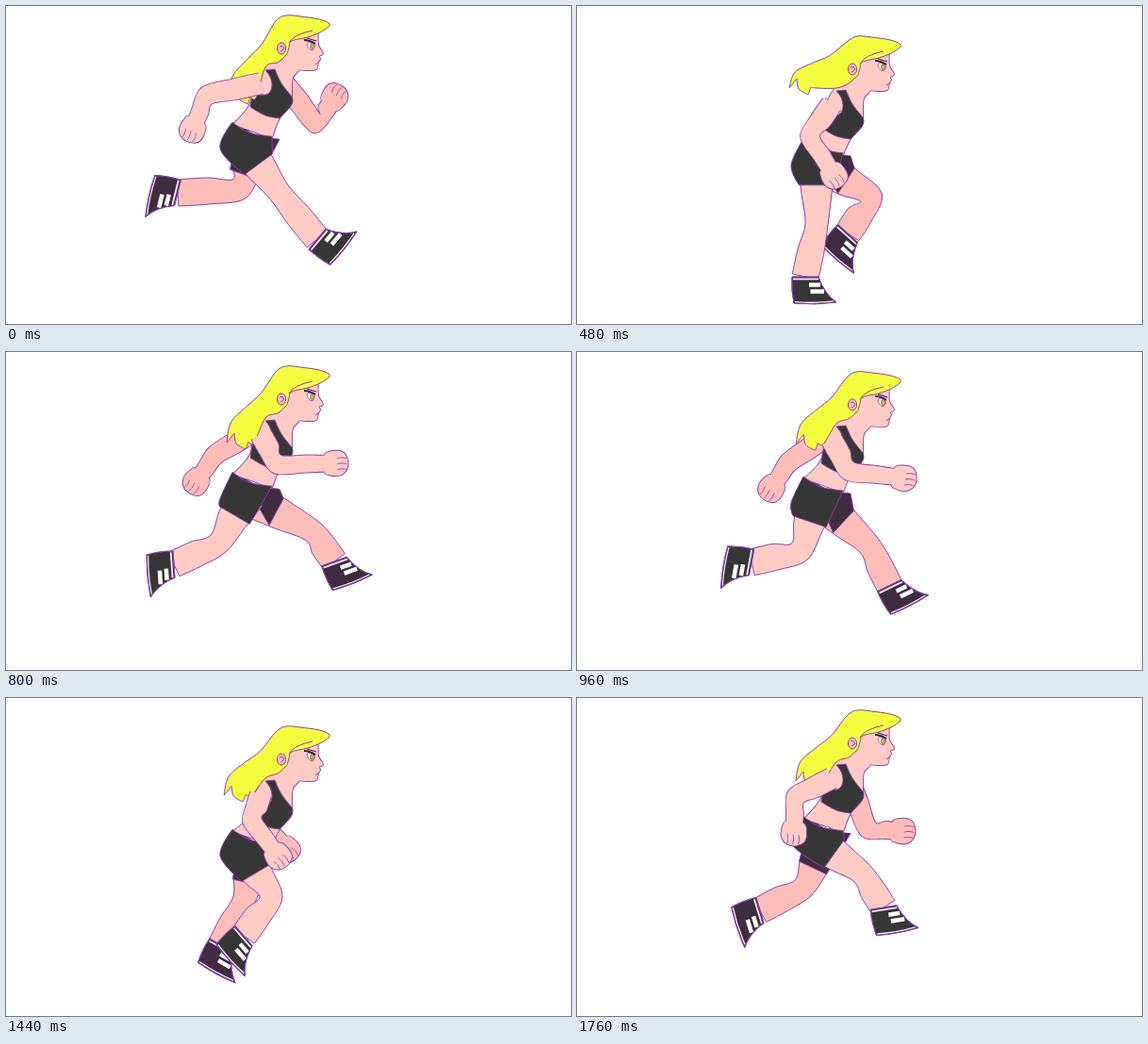
Animation of 599 by 337 pixels, one loop 1920 ms. Source, as an HTML page:

```html
<!DOCTYPE html>
<html lang="en">
<head>
<meta charset="utf-8">
<title>Run cycle</title>
<style>
html, body { margin: 0; width: 100%; height: 100%; overflow: hidden; background: #fff; }
svg { display: block; width: 100vw; height: 100vh; }
</style>
</head>
<body>
<svg id="stage" viewBox="0 0 599 337"></svg>
<script>
const STEP = 160, COUNT = 12;
const LINE = '#8440a8', NEAR = '#ffcbc5', FAR = '#ffbdb9', DARK = '#373636', DUSK = '#402c40', HAIR = '#f4fe3f';

// Key poses by drawing number; the drawings between them are interpolated.
// head: vertical shift, tip: height of the hair tip, legs: knee, ankle, foot angle, arms: elbow, hand.
const keys = {
  0: { head: -16, tip: 97, nearLeg: [290, 198, 330, 247, -50], farLeg: [247, 194, 182, 198, 104], nearArm: [213, 95, 198, 130], farArm: [330, 125, 348, 97] },
  1: { head: 0, tip: 90, nearLeg: [284, 218, 302, 272, -26], farLeg: [264, 213, 205, 237, 93], nearArm: [230, 117, 221, 159], farArm: [305, 147, 341, 127] },
  3: { head: 6, tip: 87, nearLeg: [254, 232, 242, 287, 0], farLeg: [312, 203, 287, 241, 42], nearArm: [247, 138, 272, 179], farArm: [265, 140, 270, 172] },
  5: { head: -11, tip: 96, nearLeg: [225, 203, 178, 225, 86], farLeg: [325, 190, 348, 222, -20], nearArm: [288, 119, 348, 118], farArm: [222, 109, 202, 137] },
  7: { head: 3, tip: 98, nearLeg: [254, 222, 206, 231, 98], farLeg: [289, 222, 298, 274, -18], nearArm: [282, 135, 328, 158], farArm: [238, 130, 228, 156] },
  9: { head: 4, tip: 103, nearLeg: [281, 211, 252, 252, 49], farLeg: [252, 215, 228, 262, 30], nearArm: [261, 130, 288, 167], farArm: [280, 140, 297, 160] },
  11: { head: -13, tip: 88, nearLeg: [302, 186, 325, 222, -9], farLeg: [240, 201, 194, 225, 73], nearArm: [232, 105, 230, 142], farArm: [309, 139, 344, 141] }
};

// Four-point midpoint of the odd neighbours, so that joints travel on smooth arcs.
function pose(i) {
  if (keys[i]) return keys[i];
  const [a, b, c, d] = [-3, -1, 1, 3].map(k => keys[(i + k + COUNT) % COUNT]);
  const mid = (p, q, r, s) => Array.isArray(p)
    ? p.map((_, k) => mid(p[k], q[k], r[k], s[k]))
    : (9 * (q + r) - p - s) / 16;
  return Object.fromEntries(Object.keys(a).map(k => [k, mid(a[k], b[k], c[k], d[k])]));
}

const pt = (x, y, hard = false) => ({ x, y, hard });
const move = (p, dx, dy, hard) => pt(p.x + dx, p.y + dy, hard);
const lerp = (p, q, t) => pt(p.x + (q.x - p.x) * t, p.y + (q.y - p.y) * t);
const heading = (p, q) => {
  const len = Math.hypot(q.x - p.x, q.y - p.y) || 1;
  return pt((q.x - p.x) / len, (q.y - p.y) / len);
};
// "x,y" words; * marks a corner
const points = (s, dy) => s.split(' ').map(w => {
  const [x, y] = w.split(',').map(parseFloat);
  return pt(x, y + dy, w.endsWith('*'));
});

function curve(pts, closed = true) {
  const n = pts.length, at = i => pts[(i + n) % n], f = v => v.toFixed(1);
  const handle = (i, s) => {
    const p = at(i), k = p.hard ? 0 : s / 6;
    return f(p.x + (at(i + 1).x - at(i - 1).x) * k) + ',' + f(p.y + (at(i + 1).y - at(i - 1).y) * k);
  };
  let d = `M${f(pts[0].x)},${f(pts[0].y)}`;
  for (let i = 0; i < n - !closed; i++)
    d += `C${handle(i, 1)} ${handle(i + 1, -1)} ${f(at(i + 1).x)},${f(at(i + 1).y)}`;
  return d + (closed ? 'Z' : '');
}

const path = (d, fill = 'none', line = LINE, w = 1) => `<path d="${d}" fill="${fill}" stroke="${line}" stroke-width="${w}"/>`;
// Several shapes sharing one outline
const merge = (shapes, fill) => shapes.map(d => path(d, fill, LINE, 1.8)).join('') + shapes.map(d => path(d, fill, 'none')).join('');

// Limb through three joints with half-widths at the joints and between them
function limb(a, b, c, widths) {
  const mid = [a, lerp(a, b, .5), b, lerp(b, c, .5), c];
  const side = s => mid.map((p, i) => {
    const d = heading(mid[Math.max(i - 1, 0)], mid[Math.min(i + 1, 4)]), w = s * widths[i];
    return move(p, d.y * w, -d.x * w, i % 4 === 0);
  });
  return curve([...side(1), ...side(-1).reverse()], false);
}

const shoe = (x, y, angle, fill) => {
  const body = 'M-14,0H14Q20,18 33,27Q10,30 -12,28Q-15,14 -14,0Z';
  return `<g transform="translate(${x} ${y}) rotate(${angle})">` + path(body, fill) +
    path('M-13,2.4H14', 'none', '#fbeafc', 1.8) + path('M-11,26.6Q10,28.2 30,25.8', 'none', '#fbeafc', 1.3) +
    path('M4,8.5H16M5.5,15.5H20', 'none', '#fff', 4.5) + path(body) + '</g>';
};

function leg([kx, ky, ax, ay, angle], hip, skin, cloth) {
  return path(limb(hip, pt(kx, ky), pt(ax, ay), [20, 16, 12, 14, 14]), skin) + shoe(ax, ay, angle, cloth);
}

// Waist line plus a cuff set across the thigh
function shorts([kx, ky], hip, reach, half, seat, fill) {
  const d = heading(hip, pt(kx, ky)), cuff = move(hip, d.x * reach, d.y * reach);
  const outline = [move(hip, -14, -26, true), move(hip, 4, -15), move(hip, 28, -11, true),
    move(cuff, d.y * half, -d.x * half, true), move(cuff, -d.y * half, d.x * half, true)];
  return path(curve(seat ? [...outline, move(hip, -27, 2)] : outline), fill);
}

function arm([ex, ey, hx, hy], shoulder, skin) {
  const elbow = pt(ex, ey), hand = pt(hx, hy), d = heading(elbow, hand);
  const local = p => pt(hx + d.x * p.x - d.y * p.y, hy + d.y * p.x + d.x * p.y);
  const fist = curve(points('-10,-9 -2,-13 9,-12 14,-4 13,7 5,13 -6,12 -11,8', 0).map(local));
  const creases = [-5, 1, 7].map(v => curve([pt(3, v), pt(8, v - 1), pt(13, v)].map(local), false)).join('');
  return merge([limb(shoulder, elbow, hand, [11, 11, 10, 9, 8]), fist], skin) + path(creases, 'none', LINE, .9);
}

function hair(dy, tipY) {
  const tip = pt(231 + (tipY - dy - 98) * .35, tipY, true), crown = pt(286, 32 + dy);
  const strand = (t, dx, y) => move(lerp(crown, tip, t), dx, y);
  return curve([
    ...points('298,67* 300,60 303,53 320,49 333,44 342,38 342,34 332,30 312,27 297,26', dy), crown,
    strand(.3, 0, 0), strand(.55, -2, -5), strand(.82, -5, -8), tip,
    move(tip, 8, -10, true), move(tip, 10, 1), move(tip, 20, 7, true), move(tip, 23, -1, true), move(tip, 29, 0),
    ...points('275,81 288,76 295,70', dy)
  ]);
}

const features = dy => `<g transform="translate(0 ${dy})">` +
  `<ellipse cx="292" cy="61" rx="4.6" ry="6" fill="${FAR}" stroke="${LINE}"/>` +
  path('M290,59Q294,57 294.5,61Q293,64 291,64') +
  path('M300,55Q305,46 325,42') +
  path('M319,56Q323,52 327,55Q329,60 325,63Q320,62 319,56Z', '#fff', LINE, .8) +
  '<ellipse cx="324.5" cy="58.5" rx="1.8" ry="3.2" fill="#e9c53c" stroke="#4a2a4c" stroke-width=".7"/>' +
  path('M316,52Q321,52 328,56', 'none', '#3a2040', 1.9) +
  path('M319,50L329,53', 'none', '#4a2a4c', 1.3) +
  path('M328,78L332,75') + '</g>';

function figure(p) {
  const dy = p.head, hip = pt(254, 162 + .8 * dy), farHip = move(hip, 8, 3);
  const farShoulder = pt(278 + .25 * (p.farArm[0] - 278), 94 + dy);
  const face = curve(points('296,50* 331,42* 331,57 336,66 332,69 333,72 331,76 329,83 320,84 310,83 297,77*', dy));
  const torso = curve([...points('288,64* 311,80 304,92 303,108 302,121 290,135', dy),
    move(hip, 28, -9, true), move(hip, -13, -24, true), ...points('258,121 264,98 274,80', dy)]);
  const top = curve(points('275,84* 285,83* 292,98 303,112* 303,120 290,135* 275,132 259,123* 262,104* 268,110 278,109 282,101 280,91', dy));
  return '<g visibility="hidden">' +
    arm(p.farArm, farShoulder, FAR) +
    leg(p.farLeg, farHip, FAR, DUSK) + shorts(p.farLeg, farHip, 28, 16, false, DUSK) +
    merge([torso, face], NEAR) +
    leg(p.nearLeg, hip, NEAR, DARK) + shorts(p.nearLeg, hip, 23, 18.5, true, DARK) +
    path(top, DARK) + path(hair(dy, p.tip), HAIR) + features(dy) +
    arm(p.nearArm, pt(270, 98 + dy), NEAR) + '</g>';
}

const stage = document.getElementById('stage');
stage.innerHTML = '<g stroke-linejoin="round">' +
  Array.from({ length: COUNT }, (_, i) => figure(pose(i))).join('') + '</g>';
const figures = [...stage.firstChild.children];
const start = performance.now();

function draw() {
  const now = Math.floor((performance.now() - start) / STEP) % COUNT;
  figures.forEach((g, i) => g.setAttribute('visibility', i === now ? 'visible' : 'hidden'));
  requestAnimationFrame(draw);
}
draw();
</script>
</body>
</html>
```
